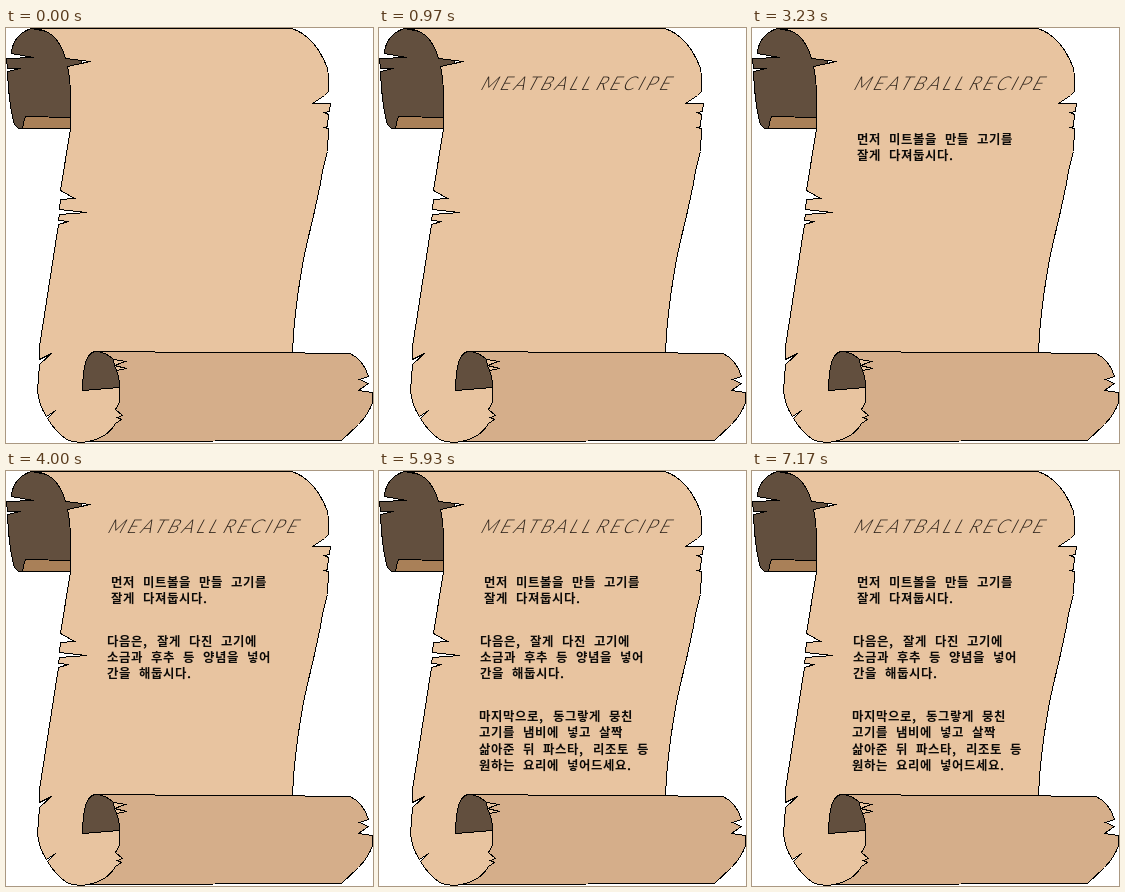
Write an HTML page that moves like this. It is 367 by 415 pixels and loops after 8000 ms.

```html
<!DOCTYPE html>
<html lang="ko">
<head>
<meta charset="utf-8">
<title>Recipe scroll</title>
<style>
html, body { margin: 0; width: 100%; height: 100%; overflow: hidden; background: #fff; }
svg { display: block; width: 367px; height: 415px; }
.paper { stroke: #000; stroke-width: 1; shape-rendering: crispEdges; }
.title { font: italic 300 19px Lato, "Open Sans", sans-serif; letter-spacing: 3.2px; word-spacing: -5px; fill: #2a2018; }
.step { font: 700 12.4px "Noto Sans CJK KR", "Noto Sans CJK", "Noto Sans CJK JP", sans-serif; fill: #0c0a08; }
</style>
</head>
<body>
<svg viewBox="0 0 367 415">
  <g class="paper" transform="translate(.5 .5)">
    <!-- back of the upper curl -->
    <path fill="#624f3e" d="M25 0Q14 3 8 13Q5 19 5 25L27 29L0 30L1 40L14 40L1 43Q2 72 7 93Q9 99 13 100L64 100L75 33L50 5Z"/>
    <path fill="#a98058" d="M19 88L64 89V100L16 100Q17 93 19 88Z"/>
    <!-- sheet -->
    <path fill="#e8c4a0" d="M25 0H285Q295 3 303 11Q314 21 321 40Q322 44 322 63L318 67L306 75L324 75L323 83L318 84L322 86L321 98L318 99L322 100L321 123Q316 140 314 155L306 192Q298 223 294 248Q289 280 287 305L286 324L200 390L82 413Q72 415 62 412Q50 405 41 390L49 382L40 388Q33 378 31 363L33 336L45 325L33 331L33 318L52 196L62 193L52 192L53 186L80 184L53 181L54 171L68 170L54 162L64 100V70Q64 50 61 38L84 33L59 30Q55 15 46 7Q37 0 25 0Z"/>
    <!-- lower roll -->
    <path fill="#d5ae8a" d="M88 323.1L343 324.8Q357 331 362 348L353 351L362 355L352 362L366 364L366 374Q362 386 352 396L335 412L82 413Q101 409 109 395L115 391L111 389L116 387L109 381L113 374L113 359Q113 349 110 342L120 340L108 337L119 333L107 331Q99 323 88 323.1Z"/>
    <path fill="#624f3e" d="M88 323Q82 325 79 334Q76 346 76 362L113 359Q113 349 110 342L108 337L107 331Q99 323 88 323Z"/>
  </g>
  <g id="ink"></g>
</svg>
<script>
const LOOP = 8000;
const NS = "http://www.w3.org/2000/svg";
const ink = document.getElementById("ink");

const steps = [
  { at: 2070, x: 105, y: 115.5, lead: 16, lines: ["먼저 미트볼을 만들 고기를", "잘게 다져둡시다."] },
  { at: 4000, x: 101, y: 174.5, lead: 16, lines: ["다음은, 잘게 다진 고기에", "소금과 후추 등 양념을 넣어", "간을 해둡시다."] },
  { at: 5930, x: 100, y: 249.5, lead: 16.5, lines: ["마지막으로, 동그랗게 뭉친", "고기를 냄비에 넣고 살짝", "삶아준 뒤 파스타, 리조토 등", "원하는 요리에 넣어드세요."] }
];

function add(parent, tag, attrs, text = "") {
  const el = document.createElementNS(NS, tag);
  for (const key in attrs) el.setAttribute(key, attrs[key]);
  el.textContent = text;
  return parent.appendChild(el);
}

// Fixed-pitch setting: syllables 12px, spaces 8px, punctuation 6px.
function gridX(text, x) {
  return [...text].map(ch => {
    const left = x;
    x += /[가-힣]/.test(ch) ? 12 : ch === " " ? 8 : 6;
    return left;
  }).join(" ");
}

const title = add(ink, "text", { class: "title", transform: "translate(101 62) skewX(-22)" }, "MEATBALL RECIPE");
const cues = [{ at: 970, el: title }];

for (const { at, x, y, lead, lines } of steps) {
  const el = add(ink, "g", { class: "step" });
  lines.forEach((line, i) => add(el, "text", { x: gridX(line, x), y: y + i * lead }, line));
  cues.push({ at, el });
}

const start = performance.now();
function draw() {
  const t = (performance.now() - start) % LOOP;
  for (const { at, el } of cues) el.style.visibility = t >= at ? "visible" : "hidden";
  requestAnimationFrame(draw);
}
draw();
</script>
</body>
</html>
```
